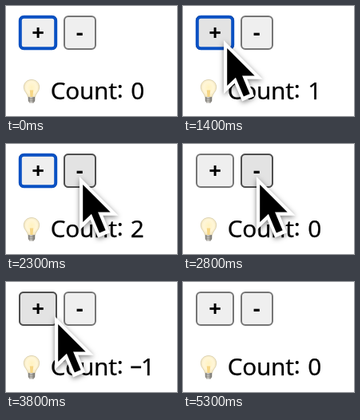
Recreate the animation shown at these times as an HTML page. Size 214 px wide and 138 px high, loop 5500 ms.

```html
<!DOCTYPE html>
<html lang="en">
<head>
<meta charset="utf-8">
<title>Counter</title>
<style>
  html, body { margin: 0; width: 100%; height: 100%; overflow: hidden; background: #fff; }
  svg { display: block; width: 214px; height: 138px; }
  text { font-family: "Noto Sans", "Open Sans", sans-serif; fill: #000; }
  .label { font-size: 29.8px; letter-spacing: -.3px; stroke: #000; stroke-width: .25; }
  .dash { letter-spacing: -1.2px; }
  .sign { font-size: 27.5px; font-weight: 600; text-anchor: middle; }
  .button { fill: #efefef; stroke: #767676; stroke-width: 2; }
  .hover { fill: #e3e3e3; stroke: #4f4f4f; }
  .ring { fill: none; stroke: #0a51c3; stroke-width: 4; }

  .hover, .ring, .values, .cursor { animation: 5.5s infinite; }
  .hover, .ring, .values { animation-timing-function: step-end; }
  .plus { animation-name: plus; }
  .minus { animation-name: minus; }
  .ring { animation-name: ring; }
  .values { animation-name: count; }
  .cursor {
    animation-name: move, show;
    animation-timing-function: linear, step-end;
    filter: drop-shadow(0 2.5px 3px rgba(0, 0, 0, .5));
  }

  @keyframes plus {
    0%, 36.363%, 80% { opacity: 0; }
    14.545%, 67.272% { opacity: 1; }
  }
  @keyframes minus {
    0%, 63.636% { opacity: 0; }
    38.181% { opacity: 1; }
  }
  @keyframes ring {
    0% { opacity: 1; }
    45.454%, 100% { opacity: 0; }
  }
  /* One row of the number strip is 40px. */
  @keyframes count {
    0%, 50.909%, 74.545%, 100% { transform: translateY(0); }
    21.818%, 45.454% { transform: translateY(-40px); }
    29.09% { transform: translateY(-80px); }
    54.545%, 69.09% { transform: translateY(40px); }
    58.181% { transform: translateY(80px); }
  }
  @keyframes show {
    0%, 80% { opacity: 0; }
    5.454% { opacity: 1; }
  }
  @keyframes move {
    0%, 3.636% { transform: translate(98px, 140px); }
    5.454% { transform: translate(97px, 112px); }
    7.272%, 9.09% { transform: translate(95px, 92px); }
    10.909% { transform: translate(84px, 79px); }
    12.727% { transform: translate(67px, 59px); }
    14.545% { transform: translate(55px, 46px); }
    16.363%, 32.727% { transform: translate(51px, 43px); }
    34.545% { transform: translate(67px, 42px); }
    36.363% { transform: translate(79px, 48px); }
    38.181% { transform: translate(88px, 45px); }
    40%, 61.818% { transform: translate(92px, 41px); }
    63.636% { transform: translate(84px, 47px); }
    65.454% { transform: translate(72px, 49px); }
    67.272% { transform: translate(63px, 45px); }
    69.09%, 76.363% { transform: translate(61px, 43px); }
    78.181%, 100% { transform: translate(63px, 50px); }
  }
</style>
</head>
<body>
<svg viewBox="0 0 214 138">
  <defs>
    <radialGradient id="glow" cx=".5" cy=".45" r=".6">
      <stop offset="0" stop-color="#fff2c0"/>
      <stop offset=".55" stop-color="#fff6d8"/>
      <stop offset="1" stop-color="#eee0b4"/>
    </radialGradient>
    <linearGradient id="metal">
      <stop offset="0" stop-color="#77756f"/>
      <stop offset=".4" stop-color="#d4d2cc"/>
      <stop offset="1" stop-color="#716f69"/>
    </linearGradient>
    <clipPath id="row"><rect x="150" y="88" width="64" height="40"/></clipPath>
  </defs>

  <rect class="button" x="17" y="13" width="46" height="41" rx="5"/>
  <rect class="button hover plus" x="17" y="13" width="46" height="41" rx="5"/>
  <rect class="ring" x="17.8" y="13.8" width="44.4" height="39.4" rx="4.5"/>
  <text class="sign" x="40" y="42.6">+</text>

  <rect class="button" x="73" y="13" width="39" height="41" rx="5"/>
  <rect class="button hover minus" x="73" y="13" width="39" height="41" rx="5"/>
  <text class="sign" x="92.3" y="42.5">-</text>

  <g class="bulb">
    <path d="M32 92.5C26.3 92.5 22.3 96.6 22.3 102C22.3 107.3 26.8 109.5 27.8 114.5H36.2C37.2 109.5 41.7 107.3 41.7 102C41.7 96.6 37.7 92.5 32 92.5Z"
      fill="url(#glow)" stroke="#d6cba8" stroke-width=".8"/>
    <path d="M30.5 114L29.8 105.5H34.2L33.5 114Z" fill="#f6d685"/>
    <path d="M27.8 114H36.2V119L34.5 121.8H29.5L27.8 119Z" fill="url(#metal)"/>
    <path d="M27.8 116.3H36.2M28 118.9H36" stroke="#77756f" stroke-width=".7"/>
  </g>

  <text class="label" x="55.7" y="117.3">Count<tspan dy="-2.5">:</tspan></text>
  <g clip-path="url(#row)">
    <g class="values label">
      <text x="155.2" y="37.3"><tspan class="dash" dy="-2.5">–</tspan><tspan dy="2.5">2</tspan></text>
      <text x="155.2" y="77.3"><tspan class="dash" dy="-2.5">–</tspan><tspan dy="2.5">1</tspan></text>
      <text x="156.2" y="117.3">0</text>
      <text x="156.2" y="157.3">1</text>
      <text x="155.8" y="197.3">2</text>
    </g>
  </g>

  <g class="cursor">
    <g transform="scale(4.2) translate(-8.2 -4.9)">
      <path d="M8.2 20.9V4.9L19.8 16.5H13L12.6 16.6Z" fill="#fff"/>
      <path d="M17.3 21.6L13.7 23.1L9 12L12.7 10.5Z" fill="#fff"/>
      <path d="M9.2 7.3V18.5L12.2 15.6L12.6 15.5H17.4Z"/>
      <rect x="12.5" y="13.6" width="2" height="8" transform="matrix(.9221 -.3871 .3871 .9221 -5.7605 6.5909)"/>
    </g>
  </g>
</svg>
</body>
</html>
```
